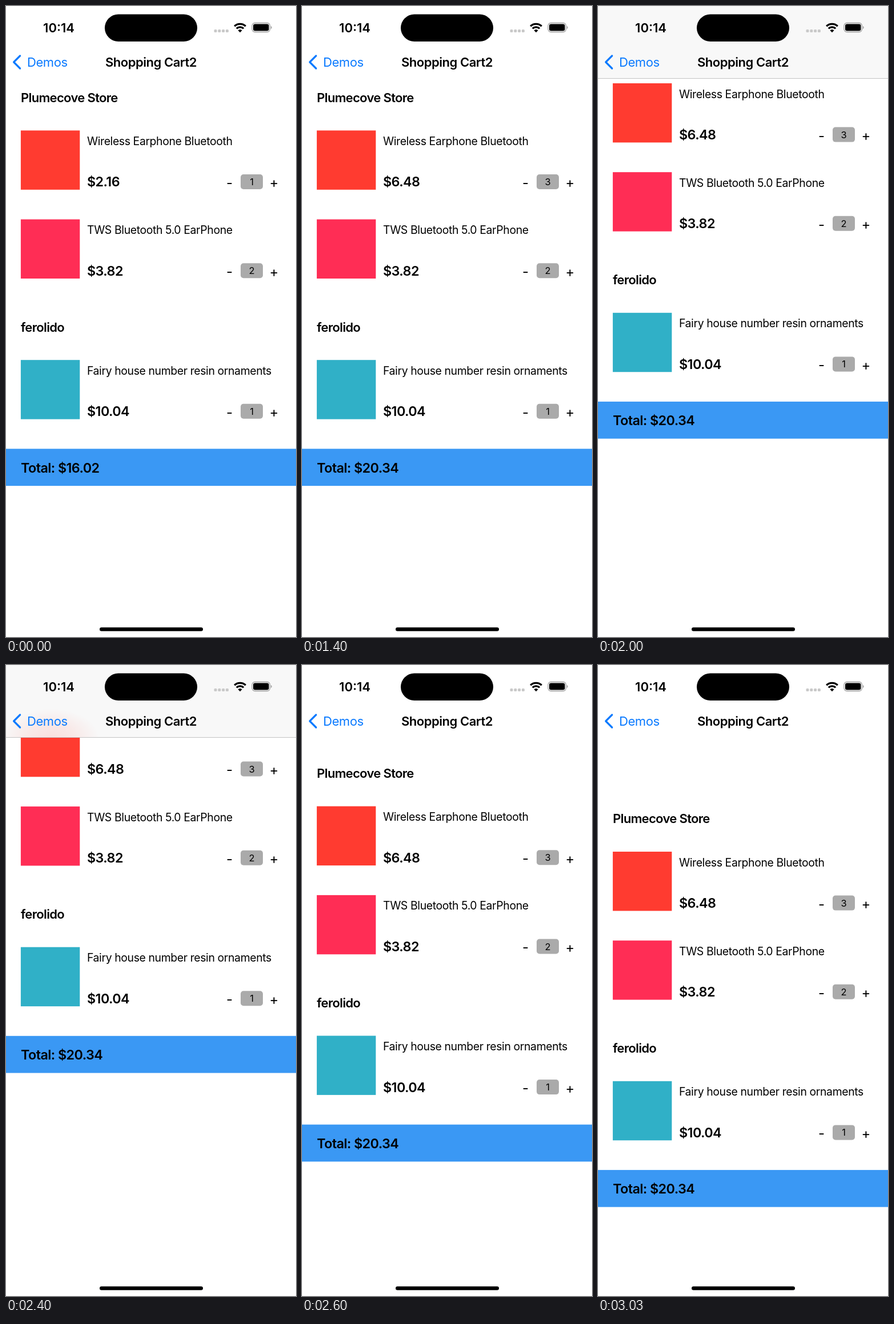
An HTML page that plays this animation: 508x1102 px, repeating every 3260 ms.

```html
<!DOCTYPE html>
<html lang="en">
<head>
<meta charset="utf-8">
<title>Shopping cart</title>
<style>
  html, body { margin: 0; width: 100%; height: 100%; overflow: hidden; background: #fff; }
  svg { display: block; width: 100%; height: 100%; }
  text { font: 400 19.4px Inter, "Open Sans", sans-serif; font-optical-sizing: none; letter-spacing: -.0195em; white-space: pre; }
  .title { font-size: 22px; font-weight: 600; letter-spacing: -.021em; }
  .shop { letter-spacing: -.03em; }
  .price { font-size: 23.3px; font-weight: 600; letter-spacing: -.024em; }
  .step { font-size: 24px; text-anchor: middle; letter-spacing: 0; }
  .qty { font-size: 16.5px; text-anchor: middle; letter-spacing: 0; }
  .back { font-size: 22px; fill: #0a7aff; }
  .mid { text-anchor: middle; }
</style>
</head>
<body>
<svg viewBox="0 0 508 1102">
  <defs>
    <radialGradient id="glow">
      <stop offset="0" stop-color="#ff3b30" stop-opacity=".13"/>
      <stop offset=".5" stop-color="#ff3b30" stop-opacity=".08"/>
      <stop offset="1" stop-color="#ff3b30" stop-opacity="0"/>
    </radialGradient>
    <clipPath id="barClip"><rect width="508" height="126"/></clipPath>
  </defs>

  <g id="list"></g>

  <rect id="bar" width="508" height="126" fill="#fff"/>
  <ellipse id="tint" cx="78" cy="128" rx="85" ry="52" fill="url(#glow)" clip-path="url(#barClip)"/>
  <rect id="rule" y="126" width="508" height="1" fill="#c4c4c4"/>

  <text class="title mid" x="92.5" y="46" style="letter-spacing:0">10:14</text>
  <rect x="173" y="14.5" width="162" height="47.5" rx="23.75"/>
  <g fill="#c9c9c9">
    <rect x="364.5" y="41" width="5" height="5" rx="1.5"/>
    <rect x="371.3" y="41" width="5" height="5" rx="1.5"/>
    <rect x="378.1" y="41" width="5" height="5" rx="1.5"/>
    <rect x="384.9" y="41" width="5" height="5" rx="1.5"/>
  </g>
  <path d="M400.2 35.2A14.3 14.3 0 0 1 419.8 35.2M403.8 39.4a9 9 0 0 1 12.4 0" fill="none" stroke="#000" stroke-width="3.3"/>
  <path d="M410 46.2l-3.6-3.6a5 5 0 0 1 7.2 0z"/>
  <rect x="431" y="29.5" width="31.5" height="16" rx="5.2" fill="none" stroke="#a0a0a0" stroke-width="1.3"/>
  <rect x="433" y="31.4" width="27.5" height="12.2" rx="3.3"/>
  <path d="M464 35v5.2q1.8-.8 1.8-2.6t-1.8-2.6z" fill="#a0a0a0"/>

  <path d="M24.6 87L13.6 98l11 11" fill="none" stroke="#0a7aff" stroke-width="3.2" stroke-linecap="round" stroke-linejoin="round"/>
  <text class="back" x="37" y="106">Demos</text>
  <text class="title mid" x="254" y="106">Shopping Cart2</text>
  <rect x="164" y="1085.3" width="181" height="6.4" rx="3.2"/>
</svg>
<script>
const LOOP = 3260;
const $ = id => document.getElementById(id);
const money = cents => '$' + (cents / 100).toFixed(2);

const items = [
  { top: 217.4, name: 'Wireless Earphone Bluetooth', color: '#ff3b30', cents: 216, qty: 1 },
  { top: 372.6, name: 'TWS Bluetooth 5.0 EarPhone', color: '#ff2d55', cents: 191, qty: 2 },
  { top: 618.2, name: 'Fairy house number resin ornaments', color: '#30b0c7', cents: 1004, qty: 1 }
];

// [start in ms, quantity of the first item, scroll offset]
const steps = [
  [0, 1, 0], [1000, 2, 0], [1400, 3, 0], [2000, 3, -82.4], [2200, 3, -130],
  [2400, 3, -125.5], [2600, 3, 29.3], [2800, 3, 96.5], [3030, 3, 108.6]
];

const shop = (name, y) => `<text class="title shop" x="26" y="${y}">${name}</text>`;

const row = ({ top, name, color }) => `
  <g transform="translate(0 ${top})">
    <rect x="25.9" width="103.4" height="103.4" fill="${color}"/>
    <text x="142" y="25.5">${name}</text>
    <text class="price cost" x="142" y="98"></text>
    <text class="step" x="391.5" y="99.5">-</text>
    <rect x="411" y="76.6" width="39" height="26" rx="5" fill="#aaa"/>
    <text class="qty" x="430.5" y="95.7"></text>
    <text class="step" x="469.5" y="100">+</text>
  </g>`;

$('list').innerHTML = shop('Plumecove Store', 167.5) + shop('ferolido', 568.5) +
  items.map(row).join('') +
  `<rect y="773.3" width="508" height="64.7" fill="#3a98f4"/>
   <text class="price" id="total" x="26" y="814.5"></text>`;

const costs = document.querySelectorAll('.cost');
const counts = document.querySelectorAll('.qty');
let shown;

function draw(now) {
  const step = steps.findLast(([start]) => start <= now % LOOP);
  if (step !== shown) {
    shown = step;
    const [, qty, scroll] = step;
    items[0].qty = qty;
    items.forEach((item, i) => {
      costs[i].textContent = money(item.cents * item.qty);
      counts[i].textContent = item.qty;
    });
    $('total').textContent = 'Total: ' + money(items.reduce((sum, item) => sum + item.cents * item.qty, 0));
    $('list').setAttribute('transform', `translate(0 ${scroll})`);
    $('bar').setAttribute('fill', scroll < 0 ? '#f8f8f8' : '#fff');
    $('rule').setAttribute('opacity', scroll < 0 ? 1 : 0);
    $('tint').setAttribute('opacity', scroll < -100 ? 1 : 0);
  }
}

const origin = performance.now();
function tick() {
  draw(performance.now() - origin);
  requestAnimationFrame(tick);
}
tick();
</script>
</body>
</html>
```
